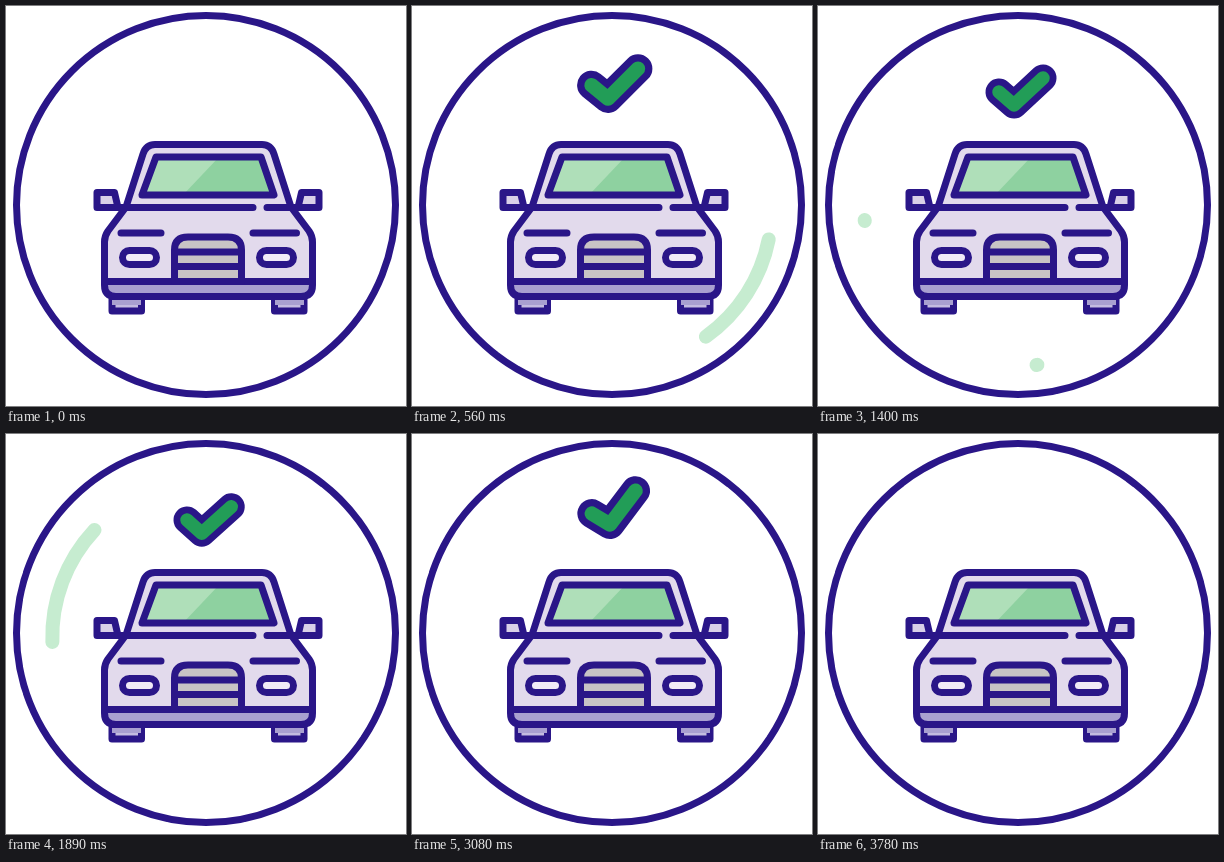
An HTML page that plays this animation: 400 by 400 pixels, repeating every 4200 ms.

```html
<!DOCTYPE html>
<html lang="en">
<head>
<meta charset="utf-8">
<title>Car check</title>
<style>
  html, body { margin: 0; width: 100%; height: 100%; overflow: hidden; background: #fff; }
  svg { display: block; width: 100vw; height: 100vh; }
  .line { stroke: #2a1688; stroke-width: 7; stroke-linecap: round; stroke-linejoin: round; }
</style>
</head>
<body>
<svg viewBox="0 0 400 400" fill="none">
  <defs>
    <path id="tick" d="M-22 0L-7 13L22-14" stroke-linecap="round" stroke-linejoin="round"/>
    <g id="side">
      <path d="M91 186.5H108.500L112 201.500H91Z" fill="#d9d0e8"/>
      <path d="M106 292H135.500V305H106Z" fill="#c4bce0"/>
      <path d="M106 294H135V299H106Z" fill="#a9a0d0" stroke="none"/>
      <rect x="116.500" y="244.500" width="34" height="14" rx="7" fill="#f1ebf7"/>
    </g>
  </defs>
  <circle class="line" cx="200" cy="199" r="189.500"/>
  <g stroke="#c6ecd0" stroke-width="14" stroke-linecap="round">
    <path id="arc1"/>
    <path id="arc2"/>
  </g>
  <g id="check">
    <use href="#tick" stroke="#2a1688" stroke-width="27"/>
    <use href="#tick" stroke="#229d57" stroke-width="13.500"/>
  </g>
  <g class="line">
    <path d="M120 201L137 148Q140 138.500 149 138.500H256Q265 138.500 268 148L285 201L303 225Q306.500 230 306.500 236V276H98.500V236Q98.500 230 102 225Z" fill="#e2daec" stroke="none"/>
    <path d="M120 201L137 148Q140 138.500 149 138.500H256Q265 138.500 268 148L285 201"/>
    <path d="M150 151H255L268 189H136Z" fill="#8ed1a0" stroke="none"/>
    <path d="M150 151H213L177 189H136Z" fill="#afdfb9" stroke="none"/>
    <path d="M150 151H255L268 189H136Z"/>
    <use href="#side"/>
    <use href="#side" transform="matrix(-1 0 0 1 404 0)"/>
    <path d="M98.500 275.500H306.500V279Q306.500 290.500 295 290.500H110Q98.500 290.500 98.500 279Z" fill="#a9a0d0"/>
    <path d="M120 201L102 225Q98.500 230 98.500 236V276M285 201L303 225Q306.500 230 306.500 236V276"/>
    <path d="M112 201.500H247M261 201.500H292M115 227H155M247 227H290.500"/>
    <path d="M168.500 275.500V244Q168.500 231 182 231H222Q235.500 231 235.500 244V275.500Z" fill="#c8c4c5"/>
    <path d="M168.500 246H235.500M168.500 260.500H235.500"/>
  </g>
</svg>
<script>
const LOOP = 4200, STEP = 70, LAST = 3780;
const $ = id => document.getElementById(id);

// Sine ease from 0 to 1 between two times
const ease = (t, from, to) => {
  const p = Math.min(1, Math.max(0, (t - from) / (to - from)));
  return (1 - Math.cos(Math.PI * p)) / 2;
};

// Angles in degrees; head and tail are [start, end] times
const arcs = [
  { el: $('arc1'), from: 11, to: 84.2, head: [56, 956], tail: [530, 1430] },
  { el: $('arc2'), from: 175.6, to: 245.2, head: [1365, 2215], tail: [1733, 3006] }
];

// Check poses: time, y, rotation, scale
const poses = [
  [70, 175, 0, 1],
  [620, 75.5, -2, 1.07],
  [1050, 86, 0, 1],
  [1400, 86, 0, 1],
  [1890, 86.3, 1, 1],
  [2620, 89.5, -4, 1],
  [3080, 75.5, -10, 1.07],
  [3780, 175, -10, 1]
];

const point = deg => {
  const a = deg * Math.PI / 180;
  return (203 + 156.7 * Math.cos(a)).toFixed(2) + ' ' + (203 + 156.7 * Math.sin(a)).toFixed(2);
};

function drawArc({ el, from, to, head, tail }, t) {
  const at = span => from + (to - from) * ease(t, ...span);
  const visible = t > head[0] && t < tail[1];
  el.setAttribute('d', visible ? `M${point(at(tail))}A156.7 156.7 0 0 1 ${point(at(head) + 0.1)}` : '');
}

function drawCheck(t) {
  let i = 0;
  while (i < poses.length - 2 && t >= poses[i + 1][0]) i++;
  const a = poses[i], b = poses[i + 1], p = ease(t, a[0], b[0]);
  const [, y, turn, size] = a.map((v, k) => v + (b[k] - v) * p);
  $('check').setAttribute('transform', `translate(203 ${y}) rotate(${turn}) scale(${size})`);
  $('check').setAttribute('visibility', t > 70 && t < LAST ? 'visible' : 'hidden');
}

function frame() {
  const t = Math.min(LAST, Math.floor(performance.now() % LOOP / STEP) * STEP);
  arcs.forEach(arc => drawArc(arc, t));
  drawCheck(t);
  requestAnimationFrame(frame);
}
frame();
</script>
</body>
</html>
```
